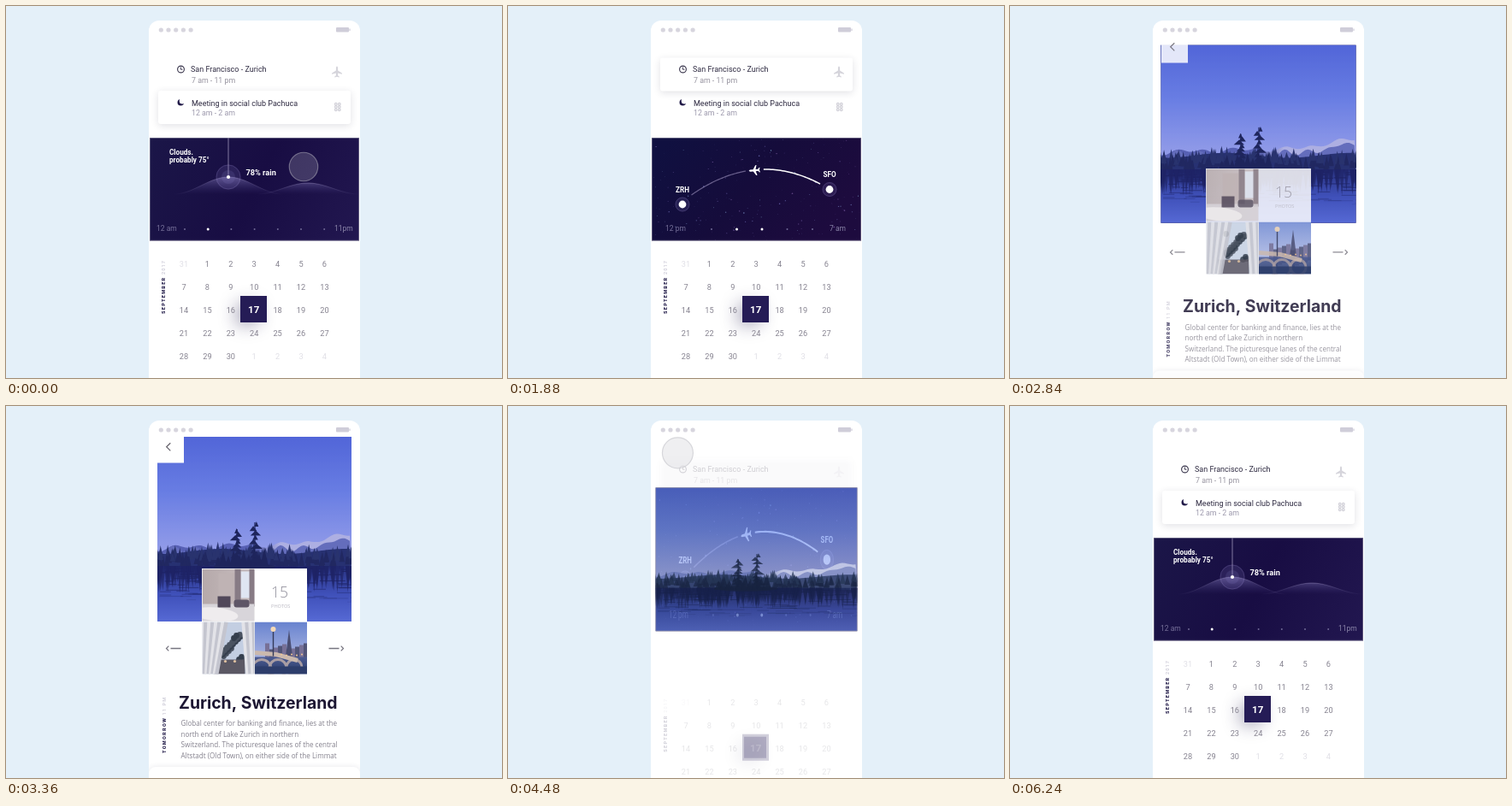
An HTML page with a canvas for the animation above (6280 ms loop, 580 by 435 pixels).

```html
<!DOCTYPE html>
<html lang="en">
<head>
<meta charset="utf-8">
<title>Travel calendar</title>
<style>
html, body { margin: 0; width: 100%; height: 100%; overflow: hidden; background: #e4f0f9; }
canvas { display: block; width: 580px; height: 435px; }
</style>
</head>
<body>
<canvas id="stage"></canvas>
<script>
const LOOP = 6280;
const canvas = document.getElementById('stage');
const c = canvas.getContext('2d');
const ratio = window.devicePixelRatio || 1;
canvas.width = 580 * ratio;
canvas.height = 435 * ratio;

const ROBOTO = 'Roboto, sans-serif';
const OPEN = '"Open Sans", "Noto Sans", sans-serif';

// Time helpers
const clamp = v => Math.max(0, Math.min(1, v));
const lerp = (a, b, p) => a + (b - a) * p;
const inOut = p => p * p * (3 - 2 * p);
const out = power => p => 1 - Math.pow(1 - p, power);
const ramp = (t, a, b, ease = inOut) => ease(clamp((t - a) / (b - a)));

function seeded(seed) {
  return () => (seed = (seed * 16807) % 2147483647) / 2147483647;
}

// Drawing helpers
function group(alpha, fn) {
  if (alpha <= 0) return;
  c.save();
  c.globalAlpha *= alpha;
  fn();
  c.restore();
}
function shadow(color, blur, dx, dy, fn) {
  c.save();
  c.shadowColor = color;
  c.shadowBlur = blur * ratio;
  c.shadowOffsetX = dx * ratio;
  c.shadowOffsetY = dy * ratio;
  fn();
  c.restore();
}
function rect(x, y, w, h, fill) {
  c.fillStyle = fill;
  c.fillRect(x, y, w, h);
}
function dot(x, y, r, fill) {
  c.fillStyle = fill;
  c.beginPath();
  c.arc(x, y, r, 0, 7);
  c.fill();
}
function ring(x, y, r, color, width = 1) {
  c.strokeStyle = color;
  c.lineWidth = width;
  c.beginPath();
  c.arc(x, y, r, 0, 7);
  c.stroke();
}
function round(x, y, w, h, r, fill) {
  c.fillStyle = fill;
  c.beginPath();
  c.roundRect(x, y, w, h, r);
  c.fill();
}
function line(pts, color, width = 1) {
  c.strokeStyle = color;
  c.lineWidth = width;
  c.beginPath();
  pts.forEach(p => c.lineTo(...p));
  c.stroke();
}
function poly(pts, fill) {
  c.fillStyle = fill;
  c.beginPath();
  pts.forEach(p => c.lineTo(...p));
  c.fill();
}
function chevron(x, y, size, dir, color, width) {
  line([[x + dir * size, y - size], [x, y], [x + dir * size, y + size]], color, width);
}
function text(s, x, y, font, color, align = 'left', spacing = 0) {
  c.font = font;
  c.fillStyle = color;
  c.textAlign = align;
  c.letterSpacing = spacing + 'px';
  c.fillText(s, x, y);
  return c.measureText(s).width;
}
function shade(x0, y0, x1, y1, ...stops) {
  const g = c.createLinearGradient(x0, y0, x1, y1);
  stops.forEach((s, i) => g.addColorStop(i / (stops.length - 1), s));
  return g;
}
function upright(strong, soft, x, y) {
  c.save();
  c.translate(x, y);
  c.rotate(-Math.PI / 2);
  const w = text(strong, 0, 0, `900 5.6px ${ROBOTO}`, '#2b2550', 'left', 1.25);
  text(soft, w + 2.4, 0, `500 5.6px ${ROBOTO}`, '#c9c7d4', 'left', 1.1);
  c.restore();
}

const wing = [[-7, 0], [-5.5, -1.1], [-1.6, -1.2], [1.6, -6.2], [3, -6.2], [1.5, -1.2],
  [4.4, -1.1], [5.8, -2.9], [6.9, -2.9], [6, 0]];
const planeShape = wing.concat(wing.slice().reverse().map(([x, y]) => [x, -y]));
function plane(x, y, angle, fill) {
  c.save();
  c.translate(x, y);
  c.rotate(angle);
  c.scale(.95, .95);
  poly(planeShape, fill);
  c.restore();
}

function phone() {
  rect(0, 0, 580, 435, '#e4f0f9');
  round(167, 17, 247, 440, 12, '#fff');
}
function statusBar() {
  for (let i = 0; i < 5; i++) dot(181.3 + i * 8.7, 28, 2.6, '#d7d5de');
  round(386, 25, 15, 5.5, 1, '#cfcdd9');
  rect(401.4, 26.5, 1.2, 2.5, '#cfcdd9');
}

function cards(first) {
  shadow('rgba(40,40,70,.14)', 9, 0, 2, () => round(178, lerp(99, 60.5, first), 225, 39, 3, '#fff'));
  const title = `400 9px ${ROBOTO}`, sub = `400 8.8px ${ROBOTO}`;
  text('San Francisco - Zurich', 216, 76.8, title, '#2f2b42');
  text('7 am - 11 pm', 217, 90, sub, '#96939f');
  text('Meeting in social club Pachuca', 217, 116.5, title, '#2f2b42');
  text('12 am - 2 am', 217, 128.2, sub, '#9c98ac');

  ring(204.5, 74, 3.9, '#37334a', 1.1);
  line([[204.5, 71.5], [204.5, 74.3], [206.5, 74.3]], '#37334a', .9);
  dot(204.3, 112.8, 3.8, '#211a48');
  dot(206.2, 111.1, 3.5, '#fff');
  plane(387, 77, Math.PI / 2, '#d5d4db');
  for (let i = 0; i < 6; i++) ring(385.8 + i % 2 * 4, 114.7 + (i >> 1) * 3.3, 1.3, '#d0cfd7', 1.2);
}

function calendar() {
  upright('SEPTEMBER', '2017', 185.6, 360);
  shadow('rgba(25,20,70,.38)', 20, -7, 6, () => rect(276, 342, 26, 25, '#251c56'));
  for (let i = 0; i < 35; i++) {
    const x = 208 + i % 7 * 27.4, y = 305.3 + Math.floor(i / 7) * 27;
    const faint = i === 0 || i > 30;
    const day = i === 0 ? 31 : i > 30 ? i - 30 : i;
    if (i !== 17) text(day, x, y, `400 9.2px ${ROBOTO}`, faint ? '#e0dfe6' : '#85828f', 'center');
  }
  rect(274, 339, 31, 31, '#251c56');
  text('17', 289.7, 359.2, `700 11.5px ${ROBOTO}`, '#fff', 'center');
}

// Forecast and flight panels
function beacon(x, y, r, core) {
  dot(x, y, r, 'rgba(140,125,200,.16)');
  ring(x, y, r - .5, 'rgba(170,155,220,.25)', .8);
  dot(x, y, core, '#fff');
}
function hours(start, x0, end, x1, count, from, gap, lit) {
  const font = `400 8.5px ${ROBOTO}`;
  text(start, x0, 263.3, font, '#77719a');
  text(end, x1, 263.3, font, '#8a84a8');
  for (let i = 0; i < count; i++) {
    const on = lit.includes(i);
    dot(from + i * gap, 261, on ? 1.5 : 1, on ? '#fff' : '#6f6995');
  }
}
function hill(peak, top, spread, alpha) {
  const pts = Array.from({ length: 41 }, (_, i) => {
    const k = i / 20 - 1;
    return [peak + k * spread, top + (220 - top) * (1 - Math.cos(k * Math.PI)) / 2];
  });
  poly(pts, shade(0, top, 0, 220, `rgba(150,140,205,${alpha})`, 'rgba(80,70,140,0)'));
  line(pts, shade(peak - spread, 0, peak + spread, 0, 'rgba(200,190,235,0)', 'rgba(200,190,235,.42)', 'rgba(200,190,235,0)'), .7);
}
function weather(grow) {
  rect(168, 154, 245, 121, shade(168, 154, 413, 275, '#1b1648', '#180d43', '#221750'));
  c.save();
  c.translate(0, 220 * (1 - grow));
  c.scale(1, grow);
  hill(353, 207, 60, .32);
  hill(260, 200, 64, .48);
  c.restore();
  line([[260, 154], [260, 200]], 'rgba(220,215,240,.6)', .9);
  dot(260, 200, 8, 'rgba(150,140,210,.14)');
  beacon(260, 200, 14.5, 2.1);
  text('Clouds.', 191, 174, `700 8.2px ${ROBOTO}`, '#fff');
  text('probably 75°', 191, 183.3, `700 8.2px ${ROBOTO}`, '#fff');
  text('78% rain', 280.5, 198.2, `700 9.2px ${ROBOTO}`, '#fff');
  hours('12 am', 176, '11pm', 384, 7, 209, 27.2, [1]);
}

const rand = seeded(4217);
const stars = Array.from({ length: 210 }, () => ({
  x: 169 + rand() * 243, y: 155 + rand() * 119, r: .25 + rand() ** 3 * .6,
  fill: `hsla(${200 + rand() * 80},60%,72%,${.2 + rand() * .5})`
}));
function arcPoint(u) {
  const v = 1 - u;
  return [213 + 152 * u, v * v * 222 + 2 * u * v * 168 + u * u * 208];
}
function arc(from, to, color, width) {
  line(Array.from({ length: 31 }, (_, i) => arcPoint(lerp(from, Math.max(from, to), i / 30))), color, width);
}
function airport(code, x, y) {
  beacon(x, y, 8.5, 4.4);
  text(code, x, y - 14.3, `700 8.2px ${ROBOTO}`, '#fff', 'center');
}
function route(t) {
  rect(168, 154, 245, 121, shade(190, 154, 350, 285, '#101040', '#150c3b', '#1d0b3e'));
  stars.forEach(s => dot(s.x, s.y, s.r, s.fill));
  const u = lerp(.97, .428, ramp(t, 700, 2520, out(2))) + .37 * ramp(t, 4700, 5870);
  arc(.01, u - .067, 'rgba(190,178,220,.5)', 1.2);
  arc(u + .07, 1, '#fff', 1.5);
  const [x, y] = arcPoint(u), [nx, ny] = arcPoint(u + .01);
  plane(x, y + .6, Math.atan2(ny - y, nx - x), '#fff');
  airport('ZRH', 204, 232);
  airport('SFO', 376, 214.5);
  hours('12 pm', 184, '7 am', 376, 5, 238, 29.5, [1, 2]);
}

// Lake view
const wood = seeded(91);
const forest = Array.from({ length: 170 }, () => ({ x: 176 + wood() * 230, h: 3 + wood() * 8, drop: wood() * 13 }));
const shore = Array.from({ length: 90 }, () => ({ x: 177 + wood() * 227, y: 189 + wood() * 40, w: 8 + wood() * 26 }));
function fir(x, base, h, w, fill = '#18233f') {
  poly([[x, base - h], [x + w, base], [x - w, base]], fill);
}
function pine(x, base, h) {
  rect(x - .6, base - h, 1.2, h, '#18233f');
  for (let k = 0; k < 9; k++) {
    const y = base - h + k * h / 10;
    fir(x + 2 * Math.sin(k * 2.4 + x), y + 5, 6, 2.5 + k % 3 * 1.6 + k * .25);
  }
}
function range(height, fill) {
  const pts = [[404, 190], [177, 190]];
  for (let x = 177; x <= 404; x += 3) pts.push([x, height(x)]);
  poly(pts, fill);
}
const peaks = x => 165 - 4 * Math.abs(Math.sin(x / 19)) - 2 * Math.sin(x / 5) - Math.max(0, x - 330) * .17;
function lake(veil) {
  rect(177, 36, 227, 140, shade(0, 36, 0, 165, '#5b78e2', '#7997f0', '#adbdf7'));
  range(x => peaks(x) + Math.max(0, 300 - x) * .03, shade(290, 0, 320, 0, '#6271b2', '#d4d9ef'));
  range(x => peaks(x) + 6 + 2.5 * Math.sin(x / 4), '#7482bd');
  range(x => 170 + 3 * Math.sin(x / 23), '#24335c');
  forest.forEach(p => fir(p.x, 176 + p.drop, p.h + 7, 3.2, p.drop > 6 ? '#1b2746' : '#263657'));
  rect(177, 187, 227, 65, shade(0, 187, 0, 252, '#26366f', '#435cb9', '#617ddd'));
  shore.forEach(s => rect(s.x, s.y, Math.min(s.w, 404 - s.x), 1.2, `rgba(23,34,76,${1.1 - (s.y - 189) / 40})`));
  forest.forEach(p => poly([[p.x - 3, 187], [p.x + 3, 187], [p.x, 199 + p.h * 1.8]], 'rgba(24,34,76,.7)'));
  c.fillStyle = '#19233f';
  c.beginPath();
  c.ellipse(279, 188, 36, 4, 0, 0, 7);
  c.fill();
  for (let i = 0; i < 10; i++) fir(248 + i * 6, 190, 14 + i * 7 % 13, 5);
  pine(270, 185, 41);
  pine(291, 188, 52);
  group(veil, () => rect(177, 36, 227, 216, '#342cb8'));
}

// Photo tiles, each drawn in its own 61 px square
function tile(x, y, fn) {
  c.save();
  c.translate(x, y);
  c.beginPath();
  c.rect(0, 0, 61, 61);
  c.clip();
  fn();
  c.restore();
}
function room() {
  rect(0, 0, 61, 61, shade(0, 0, 61, 0, '#b5a9aa', '#c9bec0'));
  rect(19, 5, 19, 32, '#bfb3b4');
  rect(45, 3, 12, 31, '#dfe5f2');
  for (const x of [38, 55]) rect(x, 0, 7, 44, '#877b85');
  rect(0, 41, 61, 20, '#d8d5da');
  rect(18, 32, 15, 13, '#51485a');
  round(37, 36, 18, 9, 3, '#5e5667');
  c.fillStyle = '#efecee';
  c.beginPath();
  c.ellipse(16, 53, 26, 8, .1, 0, 7);
  c.fill();
}
function terrace() {
  rect(0, 0, 61, 61, '#c3cee2');
  for (let i = 0; i < 26; i++) dot(23 + i * 11 % 25, 14 + i * 17 % 31, 3.4, i % 2 ? '#4a5361' : '#343e4d');
  rect(14, 44, 36, 17, '#5b5864');
  for (let i = 0; i < 8; i++) line([[i * 4, 0], [i * 2.4, 61]], i % 2 ? '#c4c5cf' : '#e3e3e8', 4.4);
  for (let i = 0; i < 4; i++) line([[48 + i * 4, 0], [53 + i * 3, 61]], i % 2 ? '#c4c5cf' : '#e3e3e8', 4.4);
  for (const x of [27, 38]) dot(x, 46, 1.6, '#e2c4a2');
}
function river() {
  rect(0, 0, 61, 61, shade(0, 0, 0, 45, '#6883cf', '#adb7e2'));
  for (let i = 0; i < 10; i++) rect(12 + i * 5, 25 + i * 7 % 9, 5, 20, i % 2 ? '#525578' : '#777096');
  fir(40, 40, 31, 4, '#4a4e72');
  rect(0, 41, 61, 20, shade(0, 41, 0, 61, '#4c5b92', '#273966'));
  for (let i = 0; i < 3; i++) ring(8 + i * 19, 55 - i, 11 - i, '#a99da3', 3);
  rect(0, 52, 61, 9, '#2d3d6b');
  line([[0, 36], [25, 38], [50, 45]], '#cbb9ae', 5);
  line([[21.5, 10], [21.5, 40]], '#343a59', 1.4);
  dot(21.5, 8.5, 3, '#f5d9b6');
  for (let i = 0; i < 5; i++) dot(31 + i * 6, 38 + i % 2, 1, '#f4c795');
}
function thumbs() {
  rect(229, 190, 123, 123, '#fff');
  tile(229.5, 190.5, room);
  tile(229.5, 252.5, terrace);
  tile(291, 252.5, river);
  text('15', 310, 224, `300 17.6px ${OPEN}`, '#92909c');
  text('PHOTOS', 310, 236, `400 5.7px ${OPEN}`, '#b8b6c0');
}

function arrow(x, dir) {
  line([[x + dir * 5, 283.5], [x + dir * 17, 283.5]], '#76747f', 1.3);
  chevron(x, 283.5, 2.8, dir, '#76747f', 1.2);
}
const story = [
  'Global center for banking and finance, lies at the',
  'north end of Lake Zurich in northern',
  'Switzerland. The picturesque lanes of the central',
  'Altstadt (Old Town), on either side of the Limmat'
];
function details() {
  upright('TOMORROW', '11 PM', 186.6, 406);
  text('Zurich, Switzerland', 202, 353.5, '700 19.4px Inter, sans-serif', '#1d1733');
  story.forEach((s, i) => text(s, 204.5, 374.4 + i * 12.4, `400 8.1px ${OPEN}`, '#85828e'));
  arrow(187.5, 1);
  arrow(394.5, -1);
  shadow('rgba(60,60,90,.12)', 6, 0, 0, () => round(167, 422, 247, 30, [8, 8, 0, 0], '#fff'));
}
function backButton(t) {
  const grow = ramp(t, 3900, 4160);
  rect(177, 36, 31 + grow, 30.5 + grow, '#fff');
  chevron(187.7, 47.8, 4.6, 1, '#69666f', 1.3);
}

function scaled(x, y, w, h, from, fn) {
  c.translate(x, y);
  c.scale(w / from[2], h / from[3]);
  c.translate(-from[0], -from[1]);
  fn();
}
const small = [168, 154, 245, 120.5], large = [177, 36, 227, 216];
function panel(t, open, trip) {
  const box = small.map((v, i) => lerp(v, large[i], open));
  const press = 1 - .01 * (ramp(t, 2400, 2500) - ramp(t, 2525, 2700));
  c.save();
  c.translate(290.5 * (1 - press), 214.3 * (1 - press));
  c.scale(press, press);
  c.beginPath();
  c.rect(...box);
  c.clip();
  group(1, () => scaled(...box, small, () => {
    if (trip < 1) weather(1 - trip);
    group(trip, () => route(t));
  }));
  const veil = .24 * (1 - ramp(t, 3400, 3900));
  group(clamp(open * 1.5), () => scaled(...box, large, () => lake(veil)));
  if (open < .5) {
    c.strokeStyle = 'rgba(150,148,170,.75)';
    c.lineWidth = 1.4;
    c.strokeRect(...box);
  }
  c.restore();
}

// Each touch appears, glides to its goal, presses and fades away
const touches = [
  { from: [348, 188], to: [291, 79], show: -140, move: [120, 560], tap: 640, gone: 1180 },
  { from: [250, 226], to: [204, 232], show: 2000, move: [2080, 2400], tap: 2420, gone: 2640 },
  { from: [190, 48], to: [295, 133], show: 4124, move: [4380, 4960], tap: 5100, gone: 5480 }
];
function pointer(t) {
  const touch = touches.find(k => t >= k.show && t < k.gone);
  if (!touch) return;
  const { from, to, show, move, tap, gone } = touch;
  const seen = clamp((t - show) / 240), p = clamp((t - tap) / (gone - tap));
  const glide = ramp(t, ...move);
  const x = lerp(from[0], to[0], glide), y = lerp(from[1], to[1], glide);
  const squeeze = Math.sin(p * Math.PI);
  const r = 18 * out(3)(seen) - 3.5 * squeeze + 4 * p * p;
  dot(x, y, r, `rgba(226,226,229,${seen * seen * .55 * clamp(1 - 2.2 * p)})`);
  ring(x, y, r, `rgba(205,204,210,${seen * .75 * (1 - p ** 6)})`, 1.2 + 1.8 * squeeze);
}

function draw(t) {
  c.setTransform(ratio, 0, 0, ratio, 0, 0);
  const open = ramp(t, 2525, 3080, out(3)) - ramp(t, 4240, 4720);
  const first = ramp(t, 660, 760) - ramp(t, 5085, 5140);
  const trip = ramp(t, 680, 960) - ramp(t, 5220, 5620);
  const reveal = clamp(open * 2 - 1);
  const home = clamp(1 - open * 1.6);

  phone();
  c.save();
  c.beginPath();
  c.roundRect(167, 17, 247, 440, 12);
  c.clip();
  group(home, () => {
    cards(first);
    c.translate(0, open * 90);
    calendar();
  });
  group(reveal, () => {
    c.translate(0, (1 - reveal) * 28);
    details();
  });
  panel(t, open, trip);
  group(reveal, () => {
    thumbs();
    backButton(t);
  });
  statusBar();
  c.restore();
  pointer(t);
}

const began = performance.now();
function frame() {
  draw((performance.now() - began) % LOOP);
  requestAnimationFrame(frame);
}
frame();
</script>
</body>
</html>
```
